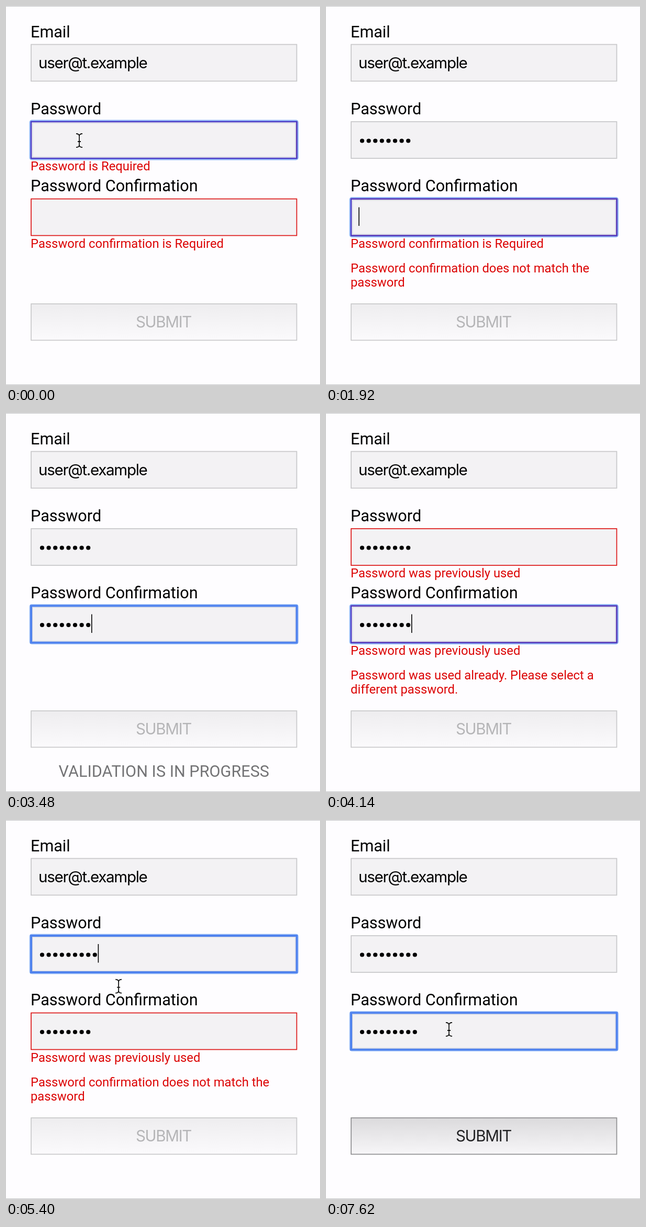
Write an HTML page that moves like this. It is 600 by 724 pixels and loops after 7.68 s.

```html
<!DOCTYPE html>
<html lang="en">
<head>
<meta charset="utf-8">
<title>Password form</title>
<style>
  html, body { margin: 0; width: 100%; height: 100%; overflow: hidden; background: #fefdff; }
  svg { display: block; width: 600px; height: 724px; }
  text { font: 30.6px Roboto, sans-serif; white-space: pre; }
  .ui { font: 29.6px Inter, sans-serif; letter-spacing: -.045em; }
  .error { font-size: 23.8px; fill: #dc0505; }
  .mid { text-anchor: middle; }
  .box { fill: #f3f2f4; stroke: #c6c6c8; stroke-width: 1.7; }
  .invalid .box { stroke: #dc1414; }
  .ring, .halo, .inner { fill: none; visibility: hidden; }
  .halo { stroke: #a6c5f8; stroke-width: 7; }
  .ring { stroke: #4f82ee; stroke-width: 4; }
  .inner { stroke: #cfd3de; stroke-width: 1.2; }
  .focus .ring, .focus .halo, .focus .inner { visibility: visible; }
  .focus.invalid .ring { stroke: #4a38c4; stroke-width: 2.4; }
  .focus.invalid .halo { stroke: #8fb5f6; }
  #submit rect { fill: url(#off); stroke: #c8c8ca; stroke-width: 1.7; }
  #submit text { fill: #b5b5b7; }
  #submit.ready rect { fill: url(#on); stroke: #8e8e90; }
  #submit.ready text { fill: #222224; }
  #busy { fill: #737375; }
  #pointer path { fill: none; stroke: #111; stroke-width: 1.8; }
  #pointer path:first-child { stroke: #fff; stroke-width: 4.4; }
</style>
</head>
<body>
<svg viewBox="0 0 600 724">
  <defs>
    <linearGradient id="off" x2="0" y2="1">
      <stop stop-color="#eeedef"/><stop offset="1" stop-color="#fbfafc"/>
    </linearGradient>
    <linearGradient id="on" x2="0" y2="1">
      <stop stop-color="#dbdadc"/><stop offset="1" stop-color="#f7f6f8"/>
    </linearGradient>
    <path id="beam" d="M-6-13Q0-13 0-8.5V8.5Q0 13-6 13M6-13Q0-13 0-8.5M6 13Q0 13 0 8.5M-3 2H3"/>
  </defs>
  <path d="M0 .5H600M0 723.5H600" stroke="#c4c4c6"/>

  <text x="47" y="59.5">Email</text>
  <rect class="box" x="48" y="73.5" width="507.5" height="70"/>
  <text class="ui" x="62" y="119">user@t.example</text>

  <g id="fields"></g>
  <text class="error" x="47" y="509"></text>
  <text class="error" x="47" y="536"></text>

  <g id="submit">
    <rect x="48" y="569" width="507.5" height="69.5"/>
    <text class="ui mid" x="301" y="614">SUBMIT</text>
  </g>
  <text id="busy" class="mid" x="301.8" y="695">VALIDATION IS IN PROGRESS</text>
  <g id="pointer"><path d="M-6-13Q0-13 0-8.5V8.5Q0 13-6 13M6-13Q0-13 0-8.5M6 13Q0 13 0 8.5M-3 2H3"/><path d="M-6-13Q0-13 0-8.5V8.5Q0 13-6 13M6-13Q0-13 0-8.5M6 13Q0 13 0 8.5M-3 2H3"/></g>
</svg>
<script>
const LOOP = 7680, BLINK = 300, KEY = 105, PITCH = 12.6;
const $ = s => document.querySelector(s);
const show = (el, on) => el.setAttribute('visibility', on ? 'visible' : 'hidden');

const makeField = (label, y) => {
  const rect = (cls, d) =>
    `<rect class="${cls}" x="${48 + d}" y="${y + d}" width="${507.5 - 2 * d}" height="${70 - 2 * d}"/>`;
  const dots = Array.from({ length: 9 }, (_, i) =>
    `<circle cx="${69 + PITCH * i}" cy="${y + 36.5}" r="4.1"/>`).join('');
  const g = document.createElementNS('http://www.w3.org/2000/svg', 'g');
  g.innerHTML = `<text x="47" y="${y - 14.2}">${label}</text>
    <rect class="halo" x="48" y="${y}" width="507.5" height="70" rx="1.5"/>
    ${rect('box', 0)}${rect('ring', 0)}${rect('inner', 2.6)}${dots}
    <rect class="caret" y="${y + 16}" width="1.6" height="35.5"/>
    <text class="error" x="47" y="${y + 93}"></text>`;
  $('#fields').append(g);
  return {
    g, dots: g.querySelectorAll('circle'),
    caret: g.querySelector('.caret'), error: g.querySelector('.error')
  };
};
const fields = [makeField('Password', 221), makeField('Password Confirmation', 368.5)];
const formLines = document.querySelectorAll('svg > .error');

const MISMATCH = ['Password confirmation does not match the', 'password'];
const REUSED = ['Password was used already. Please select a', 'different password.'];
const USED = 'Password was previously used';
const NONE = ['', ''];

// Each step: time, state changes, whether the caret blink restarts.
const steps = [
  [-300, {
    focus: 0, count: [0, 0], form: NONE, busy: false, ready: false,
    errors: ['Password is Required', 'Password confirmation is Required']
  }, true],
  [240, { errors: ['', 'Password confirmation is Required'], form: MISMATCH }],
  ...Array.from({ length: 8 }, (_, i) => [240 + i * KEY, { count: [i + 1, 0] }, true]),
  [1730, { focus: 1 }, true],
  [2135, { errors: NONE }],
  ...Array.from({ length: 8 }, (_, i) => [2135 + i * KEY, { count: [8, i + 1] }, true]),
  [2870, { form: NONE, busy: true }],
  [3950, { busy: false, errors: [USED, USED], form: REUSED }],
  [5030, { focus: 0 }, true],
  [5210, { count: [9, 8], errors: ['', USED], form: MISMATCH }, true],
  [5600, { focus: 1 }, true],
  [5870, { count: [9, 9], errors: NONE, form: NONE, busy: true }, true],
  [6890, { busy: false, ready: true }]
];

// Mouse path: time, x, y; the pointer is hidden while typing.
const path = [
  [0, 140, 257], [4560, 140, 257], [4860, 177, 225], [5010, 200, 255],
  [5280, 200, 255], [5560, 235, 400], [LOOP, 235, 400]
];
const shown = [[0, 240], [4560, 5210], [5280, 5870], [6110, LOOP]];

const pointerAt = t => {
  const i = path.findIndex(p => t < p[0]);
  const [t0, x0, y0] = path[i - 1], [t1, x1, y1] = path[i];
  const k = (t - t0) / (t1 - t0);
  return [x0 + (x1 - x0) * k, y0 + (y1 - y0) * k];
};

const draw = t => {
  const s = {};
  let reset = 0;
  for (const [at, change, blink] of steps) {
    if (at > t) break;
    Object.assign(s, change);
    if (blink) reset = at;
  }
  const caretOn = Math.floor((t - reset) / BLINK) % 2 === 0;

  fields.forEach((f, i) => {
    f.g.classList.toggle('focus', s.focus === i);
    f.g.classList.toggle('invalid', s.errors[i] !== '');
    f.dots.forEach((dot, n) => show(dot, n < s.count[i]));
    f.caret.setAttribute('x', 62.2 + PITCH * s.count[i]);
    show(f.caret, caretOn && s.focus === i);
    f.error.textContent = s.errors[i];
  });
  formLines.forEach((line, i) => { line.textContent = s.form[i]; });
  $('#submit').classList.toggle('ready', s.ready);
  show($('#busy'), s.busy);
  show($('#pointer'), shown.some(([a, b]) => t >= a && t < b));
  $('#pointer').setAttribute('transform', `translate(${pointerAt(t)})`);
};

const start = performance.now();
const tick = () => {
  draw((performance.now() - start) % LOOP);
  requestAnimationFrame(tick);
};
tick();
</script>
</body>
</html>
```
